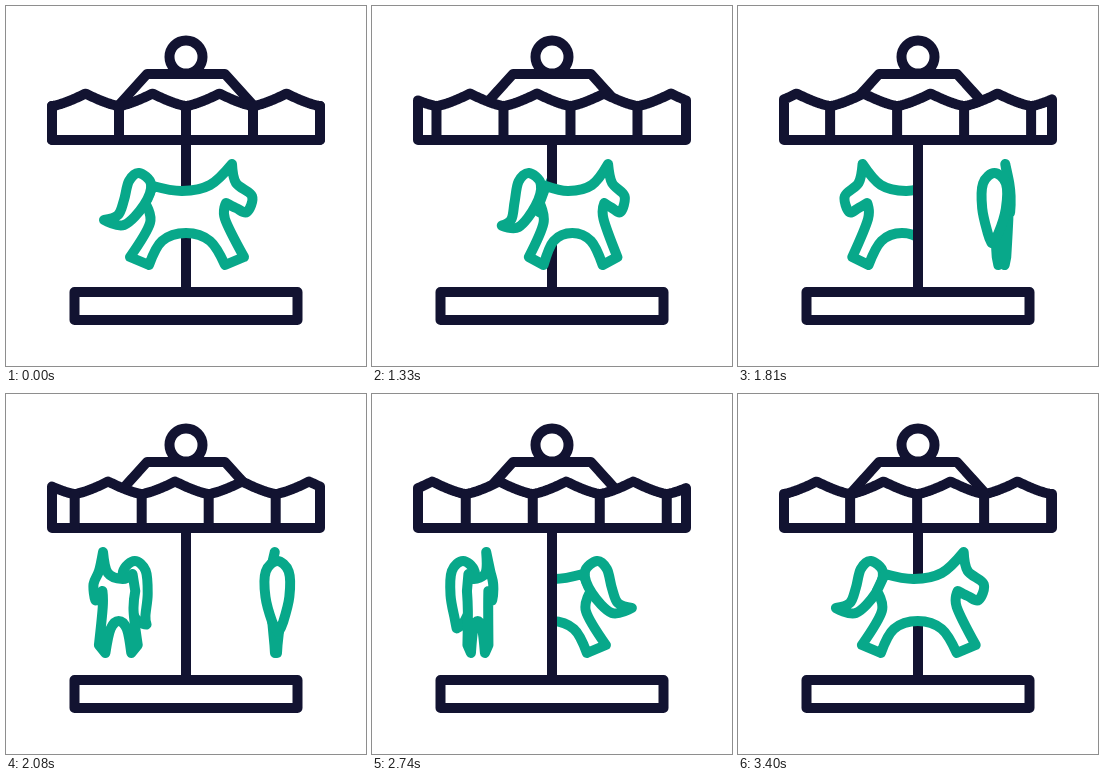
Recreate the animation shown at these times as an HTML page. Size 360x360 px, loop 3.43 s.

```html
<!DOCTYPE html>
<html lang="en">
<head>
<meta charset="utf-8">
<title>Carousel</title>
<style>
html, body { margin: 0; width: 100%; height: 100%; overflow: hidden; background: #fff; }
svg { display: block; width: 100vw; height: 100vh; }
.ink { stroke: #121331; }
.horse { stroke: #08a88a; }
</style>
</head>
<body>
<svg viewBox="0 0 360 360" fill="none" stroke-width="10" stroke-linecap="round" stroke-linejoin="round">
  <defs>
    <clipPath id="left"><rect width="180" height="360"/></clipPath>
    <clipPath id="right"><rect x="180" width="180" height="360"/></clipPath>
    <clipPath id="span"><rect x="41" y="70" width="278" height="75"/></clipPath>
  </defs>
  <g id="back" class="horse" fill="#fff"></g>
  <path class="ink" d="M180 134V286"/>
  <g class="ink">
    <path d="M113 99L141 68H219L247 99"/>
    <circle cx="180" cy="51" r="16.5"/>
    <rect x="68.5" y="286" width="223" height="28"/>
    <path id="canopy" fill="#fff"/>
    <path id="ribs" clip-path="url(#span)"/>
  </g>
  <g id="front" class="horse" fill="#fff"></g>
</svg>
<script>
const LOOP = 3430, START = 1030, SPAN = 2400, PANEL = 67, TURN = 9 * PANEL;
const $ = id => document.getElementById(id);
const clamp = v => Math.max(0, Math.min(1, v));
const mix = (a, b, k) => a + (b - a) * k;

// Key points as "x,y" from the pole; "!" marks a sharp corner.
const parse = s => s.split(' ').map(p => {
  const [x, y] = p.split(',').map(parseFloat);
  return { x, y, sharp: p.endsWith('!') };
});
const body = parse('-33,180! -4,185 24,179 46,158! 50,177 66,190 61,206 50,202 40,197! ' +
  '39,213 58,251! 39,259! 24,235 0,227 -24,235 -37,259! -56,251! -36,217 -41,197!');
const tail = parse('-47,167 -57,175 -62,194 -68,209 -82,214! -62,219 -42,199 -35,178');

// Seen end-on, the body is a thin line and the tail a teardrop.
for (const p of body) {
  p.ex = p.y > 175 && p.y < 226 ? Math.sign(p.x) * 4 : 0;
  p.ey = p.y;
}
tail.forEach((p, i) => {
  const a = i * Math.PI / 4;
  p.ex = -12 * Math.sin(a) * (1 + 0.5 * Math.cos(a));
  p.ey = 203 - 36 * Math.cos(a);
});

// Closed smooth curve through the key points.
function outline(keys, x, turn, drag) {
  const k = Math.abs(turn), dir = turn < 0 ? -1 : 1, n = keys.length;
  const pts = keys.map(p => [x + dir * (mix(p.ex, p.x, k) - drag), mix(p.ey, p.y, k)]);
  const handle = (i, side) => pts[i].map((v, j) => keys[i].sharp ? v
    : v + side * (pts[(i + 1) % n][j] - pts[(i + n - 1) % n][j]) / 6);
  let d = 'M' + pts[0];
  for (let i = 0; i < n; i++) {
    const to = (i + 1) % n;
    d += `C${handle(i, 1)} ${handle(to, -1)} ${pts[to]}`;
  }
  return d + 'Z';
}

// Half a trip: front centre, end-on at the rim, then away behind the pole.
function trip(t) {
  const rim = 1990, behind = 2710;
  if (t < rim) {
    const k = (1 - Math.cos(Math.PI * clamp((t - START) / (rim - START)))) / 2;
    return { x: 91 * k, turn: 1 - k };
  }
  const k = clamp((t - rim) / (behind - rim)) ** 1.75;
  const gone = clamp((t - behind) / (LOOP - behind)) ** 1.2;
  return { x: 91 * (1 - k ** 1.25) - 92 * gone, turn: -Math.max(k, 1e-4) };
}

function makeHorse(clip, tailOnTop) {
  const g = document.createElementNS('http://www.w3.org/2000/svg', 'g');
  const order = tailOnTop ? [body, tail] : [tail, body];
  const parts = order.map(keys =>
    [keys, g.appendChild(document.createElementNS(g.namespaceURI, 'path'))]);
  return (x, turn) => {
    const layer = $(turn < 0 ? 'back' : 'front');
    if (g.parentNode !== layer) layer.appendChild(g);
    g.setAttribute('clip-path', turn < 0 ? `url(#${clip})` : 'none');
    const trail = turn > 0 ? 40 * turn * (1 - turn) : 0;
    for (const [keys, path] of parts)
      path.setAttribute('d', outline(keys, x, turn, keys === tail ? trail : 0));
  };
}

// Symmetric cubic ease with first handle (a, b), solved by bisection.
function ease(x, a = 0.56, b = 0.06) {
  const curve = (u, h) => 3 * (1 - u) ** 2 * u * h + 3 * (1 - u) * u * u * (1 - h) + u ** 3;
  let lo = 0, hi = 1;
  for (let i = 0; i < 24; i++) {
    const u = (lo + hi) / 2;
    if (curve(u, a) < x) lo = u; else hi = u;
  }
  return curve((lo + hi) / 2, b);
}

function drawCanopy(shift) {
  let top = 'M46 134', ribs = '';
  for (let x = 46; x <= 314; x++) {
    const p = (x - 46 - shift + TURN) % PANEL;
    const f = Math.min(p, PANEL - p) / (PANEL / 2);
    top += `L${x} ${(100 - 12.5 * f ** 1.35).toFixed(2)}`;
  }
  for (let x = 46 + shift % PANEL; x < 314.1; x += PANEL) ribs += `M${x.toFixed(2)} 100V134`;
  $('canopy').setAttribute('d', top + 'V134Z');
  $('ribs').setAttribute('d', ribs);
}

const leaving = makeHorse('right', true);
const arriving = makeHorse('left', false);

function draw(t) {
  // The second horse makes the same trip mirrored and reversed in time.
  const out = trip(t), back = trip(START + LOOP - Math.max(t, START));
  leaving(180 + out.x, out.turn);
  arriving(180 - back.x, back.turn);
  drawCanopy(TURN * ease(clamp((t - START) / SPAN)));
}

const begin = performance.now();
function tick() {
  draw((performance.now() - begin) % LOOP);
  requestAnimationFrame(tick);
}
draw(0);
requestAnimationFrame(tick);
</script>
</body>
</html>
```
